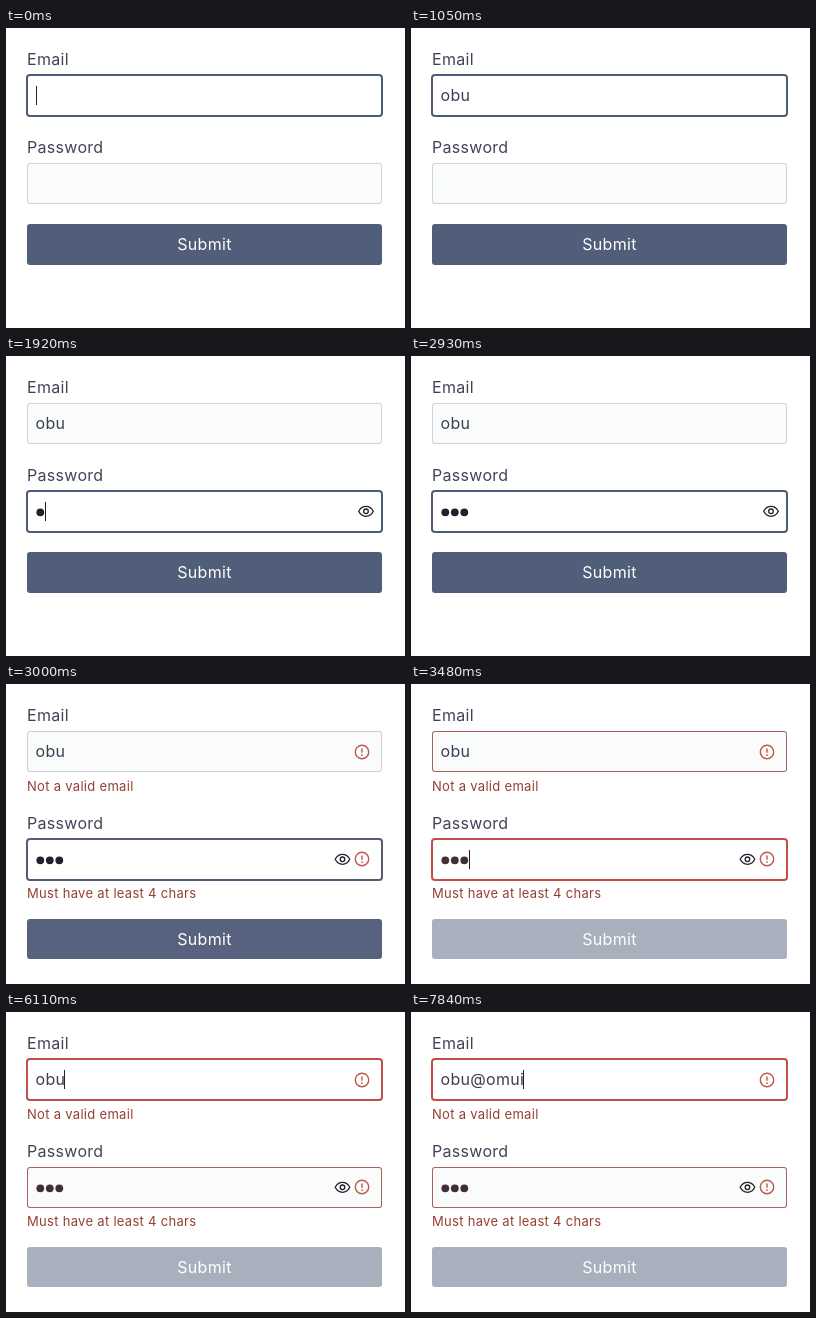
Animation, 399 px wide and 300 px high, one loop 8 s. Source, as an HTML page with a canvas:

```html
<!DOCTYPE html>
<html lang="en">
<head>
<meta charset="utf-8">
<title>Form validation</title>
<style>
  html, body { margin: 0; width: 100%; height: 100%; overflow: hidden; background: #fff; }
  canvas { display: block; width: 399px; height: 300px; }
</style>
</head>
<body>
<canvas id="stage"></canvas>
<script>
const LOOP = 8000, W = 399, H = 300;
const LEFT = 21, WIDTH = 355;
const canvas = document.getElementById('stage');
const ctx = canvas.getContext('2d');
const ratio = window.devicePixelRatio || 1;
canvas.width = W * ratio;
canvas.height = H * ratio;

const color = {
  ink: [66, 68, 86], text: [58, 62, 80], selectedText: [104, 76, 94],
  selection: [218, 219, 230], line: [209, 213, 215], focus: [79, 92, 120],
  error: [172, 98, 92], errorFocus: [194, 78, 70], message: [150, 62, 50],
  icon: [190, 88, 74], idle: [250, 251, 251], white: [255, 255, 255],
  button: [81, 94, 121], disabled: [168, 175, 189], dark: [34, 32, 44]
};

// Times at which the typed text grows by one character.
const emailKeys = [460, 660, 850, 6510, 7370, 7570, 7710, 7840];
const passwordKeys = [1850, 2140, 2410];
const address = 'obu@omui';
const caretOn = [[0, 1050], [1310, 2930], [3480, 4010], [5430, 5630], [6110, 7170], [7370, 8000]];

const count = (keys, t) => keys.filter(k => t >= k).length;
const ramp = (t, from, to) => {
  const p = Math.min(1, Math.max(0, (t - from) / (to - from)));
  return p * p * (3 - 2 * p);
};
const mix = (a, b, p) => a.map((v, i) => v + (b[i] - v) * p);
const css = (c, alpha = 1) => `rgba(${c.map(Math.round).join(',')},${alpha})`;

function box(x, y, w, h, r, fill) {
  ctx.fillStyle = fill;
  ctx.beginPath();
  ctx.roundRect(x, y, w, h, r);
  ctx.fill();
}

function write(str, x, y, size, fill, align = 'left') {
  ctx.font = `${size}px Inter, "Open Sans", sans-serif`;
  ctx.letterSpacing = '0.3px';
  ctx.textAlign = align;
  ctx.fillStyle = css(fill);
  ctx.fillText(str, x, y);
  return ctx.measureText(str).width;
}

function field(y, focus, error) {
  const idleLine = mix(color.line, color.error, error);
  const focusLine = mix(color.focus, color.errorFocus, error);
  const line = mix(idleLine, focusLine, focus);
  if (focus > 0) box(LEFT - 1, y - 1, WIDTH + 2, 43, 4, css(focusLine, focus));
  box(LEFT, y, WIDTH, 41, 3, css(line));
  box(LEFT + 1, y + 1, WIDTH - 2, 39, 2, css(mix(color.idle, color.white, focus)));
}

function caret(x, y) {
  ctx.fillStyle = css(color.dark);
  ctx.fillRect(x, y, 1, 19);
}

function disc(x, y, r) {
  ctx.beginPath();
  ctx.arc(x, y, r, 0, Math.PI * 2);
}

function eye(x, y) {
  ctx.strokeStyle = css(color.dark);
  ctx.lineWidth = 1.3;
  ctx.beginPath();
  ctx.moveTo(x - 7.3, y);
  ctx.bezierCurveTo(x - 4, y - 6.7, x + 4, y - 6.7, x + 7.3, y);
  ctx.bezierCurveTo(x + 4, y + 6.7, x - 4, y + 6.7, x - 7.3, y);
  ctx.closePath();
  ctx.stroke();
  disc(x, y, 2.3);
  ctx.stroke();
}

function alertIcon(x, y) {
  ctx.strokeStyle = ctx.fillStyle = css(color.icon);
  ctx.lineWidth = 1.4;
  disc(x, y, 6.7);
  ctx.stroke();
  ctx.beginPath();
  ctx.moveTo(x, y - 3.5);
  ctx.lineTo(x, y + 0.7);
  ctx.stroke();
  disc(x, y + 3.1, 0.9);
  ctx.fill();
}

function draw(t) {
  const invalid = t >= 3000;
  const error = ramp(t, 2960, 3220);
  const passwordFocus = ramp(t, 1270, 1580) - ramp(t, 4450, 4750);
  const emailFocus = 1 - passwordFocus;
  const onPassword = t >= 1310 && t < 4490;
  const showCaret = caretOn.some(([from, to]) => t >= from && t < to);
  const selected = t >= 4490 && t < 5430;
  const top = invalid ? 155 : 135;

  ctx.setTransform(ratio, 0, 0, ratio, 0, 0);
  ctx.fillStyle = '#fff';
  ctx.fillRect(0, 0, W, H);

  write('Email', LEFT, 37, 16, color.ink);
  field(47, emailFocus, error);
  const typed = address.slice(0, count(emailKeys, t));
  if (selected) {
    ctx.fillStyle = css(color.selection);
    ctx.fillRect(30, 58, 28, 19);
  }
  const typedWidth = write(typed, 29.5, 73, 16, selected ? color.selectedText : color.text);

  write('Password', LEFT, top - 10, 16, color.ink);
  field(top, passwordFocus, error);
  const dots = count(passwordKeys, t);
  ctx.fillStyle = css(mix(color.dark, [66, 46, 54], error));
  for (let i = 0; i < dots; i++) {
    disc(34.3 + i * 9.5, top + 21.3, 3.9);
    ctx.fill();
  }
  if (dots) eye(invalid ? 336.5 : 360, top + 20.3);

  if (showCaret) {
    if (onPassword) caret(Math.floor(30 + dots * 9.4), top + 11);
    else caret(Math.max(30, Math.floor(28.5 + typedWidth)), 58);
  }

  if (invalid) {
    alertIcon(356, 68);
    alertIcon(356, 175);
    write('Not a valid email', LEFT, 107, 13, color.message);
    write('Must have at least 4 chars', LEFT, 214, 13, color.message);
  }

  const buttonTop = invalid ? 235 : 196;
  box(LEFT, buttonTop, WIDTH, invalid ? 40 : 41, 3, css(mix(color.button, color.disabled, error)));
  write('Submit', 198.5, buttonTop + 26, 16, color.white, 'center');
}

const start = performance.now();
function tick() {
  draw((performance.now() - start) % LOOP);
  requestAnimationFrame(tick);
}
tick();
</script>
</body>
</html>
```
